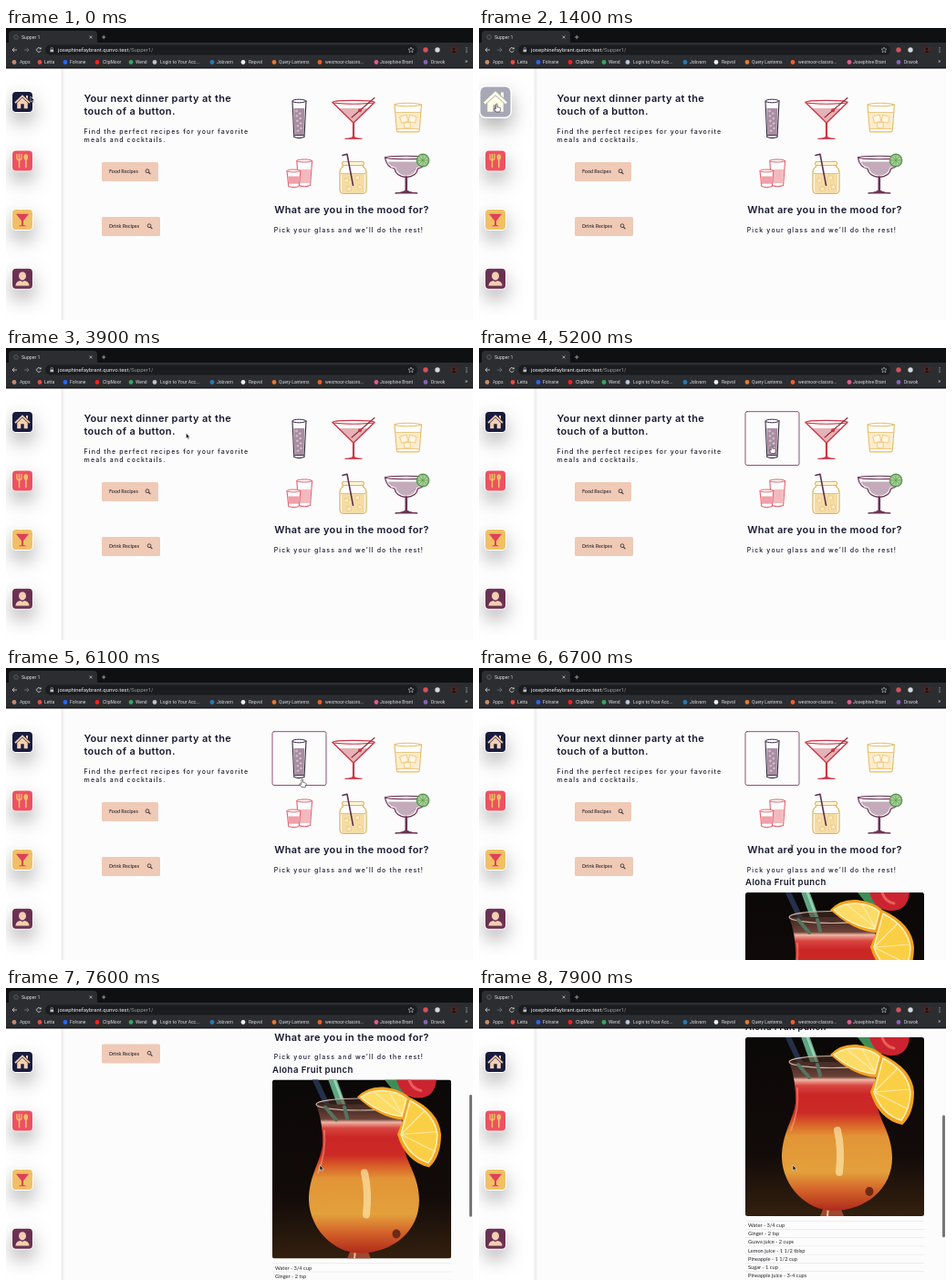
Write an HTML page with a canvas that moves like this. It is 512 px wide and 320 px high and loops after 8 s.

```html
<!DOCTYPE html>
<html lang="en">
<head>
<meta charset="utf-8">
<title>Supper 1</title>
<style>
html, body { margin: 0; width: 100%; height: 100%; overflow: hidden; background: #fcfcfc; }
canvas { display: block; width: 512px; height: 320px; }
</style>
</head>
<body>
<canvas id="stage"></canvas>
<script>
const LOOP = 8000, STEP = 100, W = 512, H = 320, TOP = 44;
const INK = '#17172f', NAVY = '#191c3e', RED = '#ec5262', GOLD = '#f1c066', PLUM = '#6b3153', PEACH = '#f3cfb2';
const canvas = document.getElementById('stage');
const c = canvas.getContext('2d');
const dpr = window.devicePixelRatio || 1;
canvas.width = W * dpr;
canvas.height = H * dpr;

// time, value(s)
const SCROLL = [[6950, 0], [7100, 14], [7200, 42], [7300, 71], [7400, 99], [7500, 124],
  [7600, 145.5], [7700, 164], [7800, 179], [7900, 192]];
const HOVER = [[100, 0], [400, 1], [2800, 1], [3100, 0]];
const POINTER = [[0, 27, 75], [500, 20, 82], [1700, 19, 84], [2400, 27, 82], [2800, 68, 81],
  [3600, 150, 90], [4600, 308, 101], [5000, 321, 107], [6000, 321, 107], [6600, 343, 198],
  [7000, 344, 198], [7200, 344, 194], [8000, 344, 194]];

function at(track, t, k = 1) {
  if (t <= track[0][0]) return track[0][k];
  for (let i = 1; i < track.length; i++) {
    const a = track[i - 1], b = track[i];
    if (t <= b[0]) return a[k] + (b[k] - a[k]) * (t - a[0]) / (b[0] - a[0]);
  }
  return track[track.length - 1][k];
}

function rect(x, y, w, h, r, fill, stroke, lw = 1) {
  c.beginPath();
  c.roundRect(x, y, w, h, r);
  paint(fill, stroke, lw);
}
function oval(x, y, rx, ry, fill, stroke, lw = 1) {
  c.beginPath();
  c.ellipse(x, y, rx, ry, 0, 0, Math.PI * 2);
  paint(fill, stroke, lw);
}
function paint(fill, stroke, lw) {
  if (fill) { c.fillStyle = fill; c.fill(); }
  if (stroke) { c.strokeStyle = stroke; c.lineWidth = lw; c.stroke(); }
}
function path(d, fill, stroke, lw = 1) {
  const p = new Path2D(d);
  if (fill) { c.fillStyle = fill; c.fill(p); }
  if (stroke) { c.strokeStyle = stroke; c.lineWidth = lw; c.stroke(p); }
}
function text(s, x, y, font, color, spacing = 0) {
  c.font = font;
  c.letterSpacing = spacing + 'px';
  c.fillStyle = color;
  c.fillText(s, x, y);
}
function shade(y0, y1, stops) {
  const g = c.createLinearGradient(0, y0, 0, y1);
  stops.forEach(([k, color]) => g.addColorStop(k, color));
  return g;
}
function shadow(color, blur, y) {
  c.shadowColor = color;
  c.shadowBlur = blur * dpr;
  c.shadowOffsetY = y * dpr;
}

const UI = 'Roboto, Arial, sans-serif';
const BODY = 'Inter, sans-serif';
const LATO = 'Lato, sans-serif';

const BOOKMARKS = [
  ['Apps', 9, 15, '#c58a6a'], ['Letta', 37, 42, '#dd5146'], ['Folvane', 65, 70, '#2b66f0'],
  ['ClipMoor', 100, 106, '#ee2222'], ['Wend', 137, 142, '#3fa45a'],
  ['Login to Your Acc...', 163, 169, '#b9c3cf'], ['Jobvarn', 226, 231, '#2a7ab8'],
  ['Repvol', 260, 266, '#eeeeee'], ['Query Lanterns', 294, 299, '#e07a35'],
  ['wexmoor-classro...', 344, 350, '#e8632c'], ['Josephine Brant', 406, 410, '#d95c8b'],
  ['Dravok', 460, 466, '#8165ad']
];

function browser() {
  c.fillStyle = '#0f1012';
  c.fillRect(0, 0, W, 17);
  c.fillStyle = '#2c2d31';
  c.fillRect(0, 16, W, TOP - 16);
  c.fillStyle = '#141517';
  c.fillRect(0, TOP - 1, W, 1.5);
  rect(3, 3, 97, 16, 4, '#2c2d31');
  oval(11, 10, 2.3, 2.3, null, '#5c5e63', 1);
  text('Supper 1', 17, 12, '5.2px ' + UI, '#dfe0e2');
  path('M91.5 8.5l3 3m0-3l-3 3M105 10h4.4m-2.2-2.2v4.4', null, '#c8c9cc', .7);

  path('M12 24H7m2.3-2.3L7 24l2.3 2.3', null, '#d5d6d9', .8);
  path('M20 24h5m-2.3-2.3L25 24l-2.3 2.3', null, '#77797e', .8);
  c.beginPath();
  c.arc(36, 24, 2.4, .4, 5.5);
  paint(null, '#d5d6d9', .8);
  path('M38.6 21v2.2h-2.2z', '#d5d6d9');
  rect(43, 18.5, 408, 11, 5.5, '#1b1c1f');
  rect(48.5, 23.4, 3.6, 2.9, .4, '#bfc1c5');
  path('M49.2 23.5v-1a1.1 1.1 0 0 1 2.2 0v1', null, '#bfc1c5', .6);
  text('josephinefaybrant.qunvo.test', 57, 26.2, '6px ' + UI, '#eceded');
  const w = c.measureText('josephinefaybrant.qunvo.test').width;
  text('/Supper1/', 57 + w, 26.2, '6px ' + UI, '#94969b');
  path('M444 21l.9 2 2.1.2-1.6 1.4.5 2.1-1.9-1.1-1.9 1.1.5-2.1-1.6-1.4 2.1-.2z', null, '#c3c5c9', .6);
  oval(460, 24, 2.7, 2.7, '#d4525c');
  oval(473, 24, 2.7, 2.7, '#d6d7d9');
  oval(491, 24, 4, 4, '#4d2721');
  oval(491, 23, 1.3, 1.4, '#1a1110');
  path('M488.5 27q2.5-4 5 0z', '#1a1110');
  for (const y of [21.8, 24, 26.2]) oval(505, y, .6, .6, '#d5d6d9');

  for (const [name, ix, tx, color] of BOOKMARKS) {
    oval(ix, 37.5, 2.4, 2.4, color);
    text(name, tx, 39.3, '5px ' + UI, '#d8d9dc');
  }
  text('»', 503, 39.4, '7px ' + UI, '#c8c9cc');
}

const NAV = [
  [81, NAVY, () => {
    path('M-8.6.4L0-7.8 8.6.4 7.4 1.7 0-5.2-7.4 1.7zM4-7h2v4l-2-2z', PEACH);
    path('M-5.8.9L0-4.5 5.8.9V7.2H1.7V2.2h-3.4V7.2h-4.1z', PEACH);
  }],
  [145.5, RED, () => {
    path('M-6-7v4q0 2 2.5 2.3M-1-7v4q0 2-2.5 2.3M-3.5-7V7', null, GOLD, 1.4);
    oval(3.8, -4, 2.3, 3.2, GOLD);
    path('M3.8-2V7', null, GOLD, 1.6);
  }],
  [210, GOLD, () => {
    path('M-7-6.2h14L1 1.3V5.8l3.7 1.4h-9.4L-1 5.8V1.3z', '#df405b');
  }],
  [274.8, PLUM, () => {
    oval(0, -3, 4, 4.6, PEACH);
    path('M-7.6 7.6Q-7 2.6-2 2.2L0 3.4 2 2.2Q7 2.6 7.6 7.6z', PEACH);
  }]
];

function sidebar(t) {
  const edge = c.createLinearGradient(60, 0, 65, 0);
  edge.addColorStop(0, 'rgba(0,0,0,.08)');
  edge.addColorStop(1, 'rgba(0,0,0,0)');
  c.fillStyle = '#fff';
  c.fillRect(0, TOP, 61, H - TOP);
  c.fillStyle = edge;
  c.fillRect(60.5, TOP, 5, H - TOP);
  NAV.forEach(([y, color, glyph], i) => {
    const h = i ? 0 : at(HOVER, t);
    c.save();
    c.translate(18, y);
    c.scale(1 + h * .5, 1 + h * .5);
    shadow('rgba(0,0,0,.3)', 20, 10);
    rect(-12, -12, 24, 24, 5, '#fff');
    shadow('transparent', 0, 0);
    c.globalAlpha = 1 - h * .62;
    rect(-11, -11, 22, 22, 4, color);
    c.globalAlpha = 1;
    if (h) c.filter = `brightness(${1 + h * .3})`;
    glyph();
    c.restore();
  });
}

function button(y, w, label) {
  rect(105, y, w, 21, 1.6, '#efcab6');
  text(label, 113, y + 12.4, 'bold 5.4px ' + LATO, '#4a3f42');
  const x = 105 + w - 12;
  oval(x, y + 9.7, 1.9, 1.9, null, '#3f3539', .9);
  path(`M${x + 1.4} ${y + 11.1}l2 2`, null, '#3f3539', 1.1);
}

function drinks() {
  c.lineJoin = c.lineCap = 'round';
  // highball
  path('M315.5 88h11.8l-.8 29h-10z', '#a98ca1');
  path('M314 80l1.8 39.5q5.6 2.2 11.2 0L329 80', null, '#33283f', 1.1);
  oval(321.5, 80, 7.5, 1.8, '#fff', '#33283f', 1);
  path('M316.5 117.6h10', null, '#33283f', 1);
  for (let i = 0; i < 9; i++) oval(318.5 + i * 3.7 % 7, 91 + i * 2.7, .9, .9, null, '#efe6ec', .6);

  // martini
  path('M364 88h34.5L381.2 103.5z', '#e4b3b7');
  path('M358 81.5L381 104l23-22.5', null, '#c93849', 1.4);
  oval(381, 81.3, 23, 1.9, null, '#c93849', 1.1);
  path('M381 104v16', null, '#c93849', 2.2);
  path('M372 121.4q8-.6 9-3 1 2.4 9 3z', '#c93849', '#c93849', .9);
  path('M404 76.5L379 98', null, '#8d2c40', 1.1);
  oval(388, 90.2, 2, 2, '#c93849');

  // tumbler
  path('M428 93h25.5l-1.4 17.5h-22.8z', '#fbeccd');
  path('M426 84l2.4 28q0 1.8 2 1.8h20.8q2 0 2-1.8L455.5 84', null, '#e9bc65', 1.2);
  oval(440.7, 84, 14.7, 1.7, null, '#e9bc65', 1);
  path('M428.8 110.5h23.6M427 92.5h27.5', null, '#e9bc65', .8);
  path('M432 97l7-2 2 7-7 2zM443 95.5l7 1.6-1.5 7-7-1.6zM437 104l6-.5.3 5.5-6 .4z', '#fff6e2', '#e9bc65', .7);

  // shots
  path('M320.5 155h13.6l-1.2 15h-11.2z', '#f3b9bd');
  path('M318.8 145.5l2 27q6.4 2.4 12.8 0l2-27', null, '#e26472', 1.1);
  oval(327.2, 145.5, 8.4, 1.5, null, '#e26472', 1);
  path('M308 156.5l1.8 17q5.8 2.2 11.6 0l1.4-17z', '#fff', '#e26472', 1.1);
  path('M309.2 162.5h12.6l-.8 8.3h-11z', '#f0a0a7');
  oval(315.4, 156.5, 7.3, 1.4, '#fff', '#e26472', 1);

  // jar
  path('M368 160h25v18q0 3-3 3h-19q-3 0-3-3z', '#f5dca6');
  path('M369.5 149v3q-3.5 2-3.5 6v19q0 4.5 4.5 4.5h20q4.5 0 4.5-4.5v-19q0-4-3.5-6v-3', null, '#dfb258', 1.2);
  rect(368.5, 146.5, 24, 4, 1.5, '#fff6e0', '#dfb258', 1);
  path('M367 159.5h27', null, '#dfb258', .8);
  path('M369 139.5l5-1.2 6.5 34', null, '#5d2e4b', 1.6);
  for (const [x, y] of [[373, 167], [385, 164], [388, 174], [376, 176]])
    rect(x - 2, y - 2, 4.5, 4.5, 1, '#fae9c5', '#e6bf70', .6);

  // margarita
  path('M415.5 142q2 11 10.5 12.2 1.5 8.8 12.8 9.3 11.3-.5 12.8-9.3 8.5-1.2 10-12.2z', '#fff', PLUM, 1.3);
  path('M418.5 146.5h40.3q-2.6 5.6-8.4 6.3-1.5 8.4-11.6 8.9-10.1-.5-11.6-8.9-6.4-.9-8.7-6.3z', '#c4abbb');
  oval(438.5, 142, 23, 1.7, '#fff', PLUM, 1.1);
  path('M438.8 163.5V179', null, PLUM, 2.6);
  path('M427 181q10-.8 11.8-4 1.8 3.2 12 4z', PLUM, PLUM, 1);
  oval(457, 145, 7.4, 7.6, '#5d9a58');
  oval(457, 145, 5.8, 6, '#a9cf95');
  for (let i = 0; i < 4; i++) {
    const a = i * Math.PI / 4, x = Math.cos(a) * 5.5, y = Math.sin(a) * 5.5;
    path(`M${457 - x} ${145 - y}L${457 + x} ${145 + y}`, null, '#5d9a58', .7);
  }
}

function photo(y) {
  c.save();
  c.translate(292, y);
  c.beginPath();
  c.roundRect(0, 0, 196, 196, 2.5);
  c.clip();
  c.fillStyle = shade(0, 196, [[0, '#0b0808'], [.65, '#120b09'], [1, '#33200f']]);
  c.fillRect(0, 0, 196, 196);
  path('M47 0L62 32', null, '#25304a', 6);
  path('M66 0L79 36', null, '#5fa585', 9);
  path('M68 0L80 32', null, '#9bd0b2', 2.5);
  path('M123 0L144 26 156 8 150 0z', '#3f8d56');
  path('M136 0q6 20 24 20 18 0 20-20z', '#cb2430');
  path('M150 0q3 10 13 12', null, '#ea5d5a', 3);

  // glass
  path('M86 186h18l4 10H82z', '#a0482f');
  path('M91 186l-1 10', null, '#e7c2a0', 2);
  path('M48 27Q56 48 55 72C52 92 40 106 40 132C41 164 68 190 96 190C132 190 161 166 161 132C161 106 147 92 144 72Q142 48 141 27z',
    shade(27, 190, [[0, '#3d2521'], [.1, '#6d4238'], [.12, '#efb5a4'], [.16, '#d8453f'], [.22, '#cb2626'],
      [.34, '#cb2a25'], [.42, '#da6129'], [.5, '#e29536'], [.74, '#e3a03b'], [.86, '#d4642a'], [1, '#b02a1c']]));
  path('M57 56Q59 80 50 102', null, 'rgba(255,190,150,.4)', 2);
  path('M101 102q5 20 2 46', null, 'rgba(255,236,180,.65)', 8);
  oval(136, 169, 4.5, 5, '#6b2a18');
  oval(94.5, 27, 46.5, 6.5, 'rgba(80,52,44,.5)', '#cdb7a5', 1.2);
  path('M58 30L70 44M79 30l3 12', null, '#55735f', 4);

  // two orange slices
  path('M93 19Q104 7 122 8Q140 10 150 19Q183 34 185 60Q185 84 172 96Q146 90 137 60L143 44Q118 42 93 19z', '#f3a41f');
  path('M97 19Q108 11 122 12Q138 13 147 21L142 40Q118 38 97 19z', '#fcdc66', '#fdf0c0', 1.5);
  path('M151 23Q179 38 181 61Q180 80 171 91Q149 84 141 60z', '#fbcf45', '#fdf0c0', 1.5);
  path('M142 38L112 14M142 38L128 13M141 60L166 35M141 60L180 57M141 60L177 78', null, '#fdeaa6', 1.2);
  c.restore();
}

const ITEMS = ['Water - 3/4 cup', 'Ginger - 2 tsp', 'Guava juice - 2 cups', 'Lemon juice - 1 1/2 tblsp',
  'Pineapple - 1 1/2 cup', 'Sugar - 1 cup', 'Pineapple juice - 3-4 cups'];

function recipe(t) {
  const loaded = t >= 6400;
  text('Aloha Fruit punch', 292, 238.2, '600 9.6px ' + BODY, INK, .42);
  if (loaded) photo(246);
  const y0 = loaded ? 452 : 256;
  ITEMS.forEach((item, i) => {
    const y = y0 + i * 9.2;
    c.fillStyle = '#e3e3e5';
    c.fillRect(292, y - 5, 196, .6);
    text(item, 295, y + 2, '5.7px ' + LATO, '#242429');
  });
}

function page(t, s) {
  c.save();
  c.beginPath();
  c.rect(0, TOP, W, H - TOP);
  c.clip();
  c.fillStyle = '#fcfcfc';
  c.fillRect(0, TOP, W, H - TOP);
  c.translate(0, -s);
  const head = '600 11px ' + BODY, sub = '500 7px ' + BODY;
  text('Your next dinner party at the', 85.4, 81, head, INK, .35);
  text('touch of a button.', 85.4, 95.4, head, INK, .35);
  text('Find the perfect recipes for your favorite', 85.6, 116, sub, INK, 1.08);
  text('meals and cocktails.', 85.6, 125.2, sub, INK, 1.08);
  button(147, 62, 'Food Recipes');
  button(207, 64, 'Drink Recipes');
  drinks();
  if (t >= 5000) rect(292, 69.7, 59, 58.8, 2, null, '#8a5274', 1);
  text('What are you in the mood for?', 294.2, 203, head, INK, .35);
  text('Pick your glass and we’ll do the rest!', 293.7, 223.6, sub, INK, 1.12);
  if (t >= 6200) recipe(t);
  c.translate(0, s);
  sidebar(t);
  if (s > 0) rect(508, 46 + s * .486, 3, 134, 1.5, '#77777a');
  c.restore();
}

function pointer(t) {
  c.save();
  c.translate(at(POINTER, t), at(POINTER, t, 2));
  if (t >= 6500 && t < 7500) {
    path('M-1.5-4q1.5 0 1.5 1.2V2.8Q0 4-1.5 4M1.5-4Q0-4 0-2.8V2.8Q0 4 1.5 4', null, '#222', .8);
  } else if (t < 2600 && t >= 200 || t >= 4700 && t < 6200) {
    path('M-.8 0q.8-1 1.6 0v3l3 .8q.8.4.6 1.4L3.6 8.5H-.6L-3 5q.4-1 2.2.3z', '#fff', '#222', .6);
  } else {
    path('M0 0v6l1.4-1.2 1 2.2 1-.5-1-2.1h1.9z', '#111', '#fff', .5);
  }
  c.restore();
}

function frame(now) {
  const t = Math.floor(now % LOOP / STEP) * STEP;
  c.setTransform(dpr, 0, 0, dpr, 0, 0);
  c.clearRect(0, 0, W, H);
  page(t, at(SCROLL, t));
  browser();
  pointer(t);
}

const start = performance.now();
function tick() {
  frame(performance.now() - start);
  requestAnimationFrame(tick);
}
tick();
</script>
</body>
</html>
```
